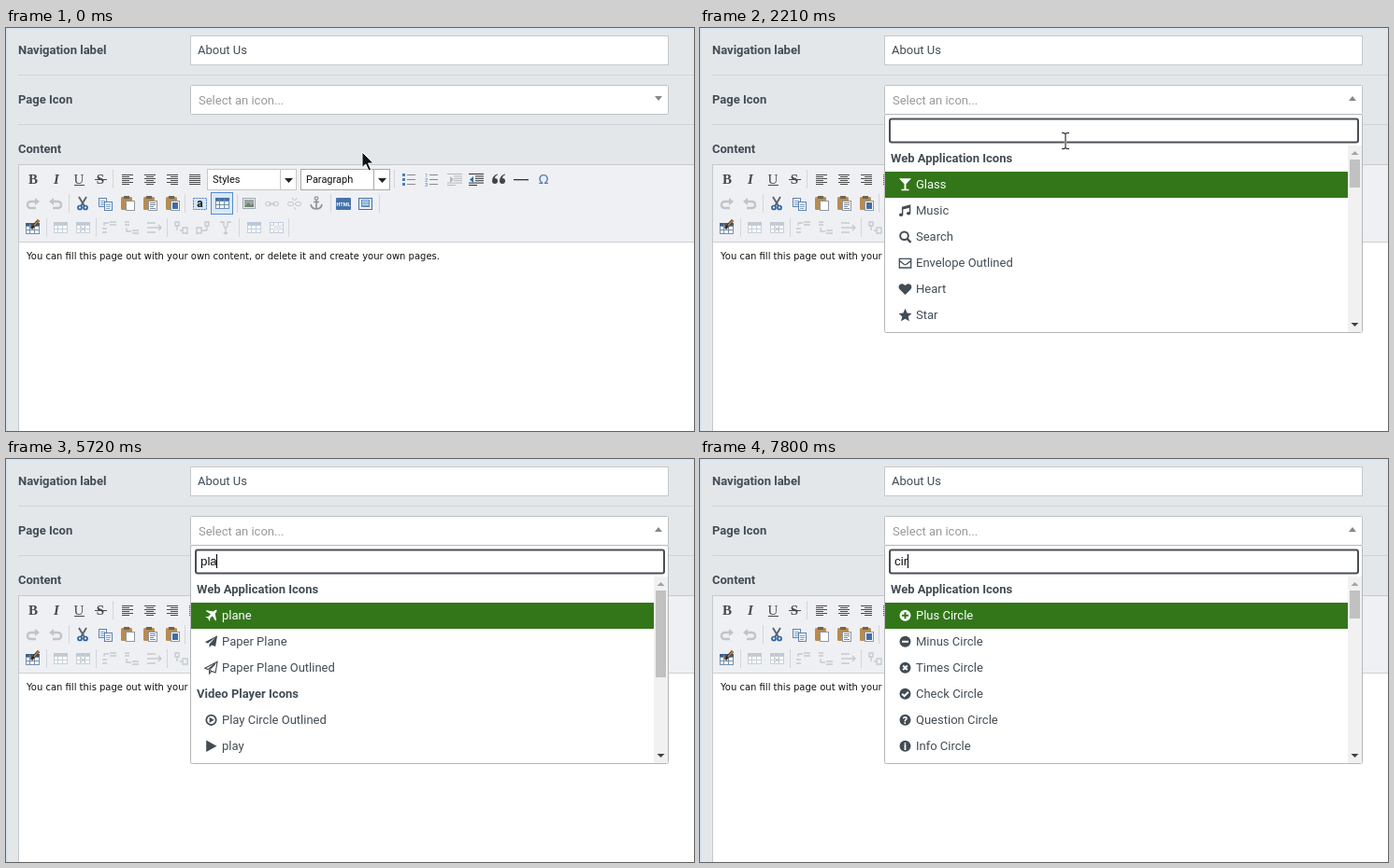
Recreate the animation shown at these times as an HTML page. Size 736x432 px, loop 8000 ms.

```html
<!DOCTYPE html>
<html lang="en">
<head>
<meta charset="utf-8">
<title>Icon picker</title>
<style>
html, body { margin: 0; width: 100%; height: 100%; overflow: hidden; background: #e4e7ea; }
svg { display: block; width: 736px; height: 432px; font: 13px Roboto, sans-serif; }
text { white-space: pre; }
.k { stroke: var(--bg); fill: none; stroke-width: 2; }
.l { stroke: currentColor; fill: none; }
</style>
</head>
<body>
<svg id="stage" viewBox="0 0 736 432" xmlns="http://www.w3.org/2000/svg"></svg>
<script>
const LOOP = 8000, STEP = 130, OPEN = 1300, BLINK = 530;
const INK = '#424c55', EDGE = '#c5c9cc', DIM = '#bfc4ca', BLUE = '#4b7fb8';

const rect = (x, y, w, h, fill, more = '') =>
  `<rect x="${x}" y="${y}" width="${w}" height="${h}" fill="${fill}" ${more}/>`;
const box = (x, y, w, h, fill, line, more = '') =>
  rect(x + .5, y + .5, w - 1, h - 1, fill, `stroke="${line}" ${more}`);
const shape = (d, fill) => `<path d="${d}" fill="${fill}"/>`;
const line = (d, color, w = 1) =>
  `<path d="${d}" fill="none" stroke="${color}" stroke-width="${w}"/>`;
const text = (x, y, s, fill = INK, more = '') =>
  `<text x="${x}" y="${y}" fill="${fill}" ${more}>${s}</text>`;
const at = (x, y, s) => `<g transform="translate(${x} ${y})">${s}</g>`;
const bold = 'font-weight="700"';

// ---- list icons, drawn around 0,0 in a 14px square ----
const solid = d => shape(d, 'currentColor');
const stroke = (d, w = 1.4) => `<path class="l" d="${d}" stroke-width="${w}"/>`;
const ring = (x, y, r, w) => `<circle class="l" cx="${x}" cy="${y}" r="${r}" stroke-width="${w}"/>`;
const cut = d => `<path class="k" d="${d}"/>`;
const disc = inner => '<circle r="6" fill="currentColor"/>' + inner;
const mark = s => text(0, 3.8, s, 'var(--bg)', 'text-anchor="middle" font-size="10.5" font-weight="900"');
const lens = ring(-1, -1, 4.3, 2) + stroke('M2.2 2.2L6 6', 2.4);
const dart = 'M6.6-6.6L4.6 5.2.5 3.6-2 6.3V2.6L4.5-4.5-3.5 1.8-6.7.4Z';
const icons = {
  glass: solid('M-6.5-6.5H6.5L1-.5V5H4V6.5H-4V5H-1V-.5Z'),
  music: solid('M-3.6 4.5V-4L5.8-6.5V3H4.4V-3L-2.2-1.2V4.5Z') +
    solid('M-6.6 4.5a2.2 1.8 0 1 0 4.4 0a2.2 1.8 0 1 0-4.4 0ZM1.4 3a2.2 1.8 0 1 0 4.4 0a2.2 1.8 0 1 0-4.4 0Z'),
  search: lens,
  zoomIn: lens + stroke('M-3.2-1H1.2M-1-3.2V1.2', 1.3),
  zoomOut: lens + stroke('M-3.2-1H1.2', 1.3),
  envelope: stroke('M-6.2-4.5H6.2V5.2H-6.2ZM-6-2.2L-1 1.7Q0 2.4 1 1.7L6-2.2', 1.3),
  heart: solid('M0 6.2L-5.8.4C-9-3-4.5-8.3 0-3.8C4.5-8.3 9-3 5.8.4Z'),
  star: solid('M0-7L2.1-2.4 7-1.9 3.3 1.5 4.4 6.5 0 4-4.4 6.5-3.3 1.5-7-1.9-2.1-2.4Z'),
  power: stroke('M-3-4.2A5.1 5.1 0 1 0 3-4.2M0-6.5V0', 1.9),
  phones: stroke('M-5.6 3V0A5.6 5.2 0 0 1 5.6 0V3', 1.7) + solid('M-4.5 1H-2V6H-4.5ZM2 1H4.5V6H2Z'),
  volume: solid('M-7-2H-4.5L-1-5V5L-4.5 2H-7Z') +
    stroke('M1-2A3 3 0 0 1 1 2M2.6-3.8A5 5 0 0 1 2.6 3.8M4.2-5.4A7.2 7.2 0 0 1 4.2 5.4', 1.3),
  print: stroke('M-4-1V-5.5H2L4-3.5V-1') + solid('M-6.5 0Q-6.5-1.2-5.3-1.2H5.3Q6.5-1.2 6.5 0V4.4H-6.5Z') +
    '<path d="M-4 2H4V5.5H-4Z" fill="var(--bg)" stroke="currentColor" stroke-width="1.3"/>',
  plane: solid('M6-6Q3.7-6.4 2.4-4.3L-4.9-5.6-5.8-4.7-.5-1.5-3.2 1.3-5.4 1.1-6 1.8-3.2 3.1-1.9 6-1.2 5.3-1.4 3.1 1.4.4 4.6 5.8 5.5 4.9 4.2-2.4Q6.4-3.7 6-6Z'),
  dart: solid(dart),
  dartLine: stroke(dart + 'M-2 2.6L.5 3.6', 1.1),
  playRing: ring(0, 0, 5.2, 1.8) + solid('M-1.9-3L3.2 0-1.9 3Z'),
  play: solid('M-5.3-6.2L6 0-5.3 6.2Z'),
  plusDisc: disc(cut('M-3.5 0H3.5M0-3.5V3.5')),
  minusDisc: disc(cut('M-3.5 0H3.5')),
  timesDisc: disc(cut('M-2.3-2.3L2.3 2.3M2.3-2.3L-2.3 2.3')),
  checkDisc: disc(cut('M-3.4 0L-.9 2.4 3.4-2')),
  askDisc: disc(mark('?')),
  infoDisc: disc(mark('i')),
  plus: stroke('M-5.5 0H5.5M0-5.5V5.5', 2.6),
  plusBox: solid('M-6-6H6V6H-6Z') + cut('M-4 0H4M0-4V4'),
  reply: solid('M-7-1L-2-6V-3Q6-3 6 5Q3 1-2 1V4Z'),
  cog: ring(0, 0, 3.6, 3) + `<circle class="l" r="5.8" stroke-width="2" stroke-dasharray="2.3 2.25"/>`,
  clock: ring(0, 0, 5.2, 1.8) + stroke('M0-3.2V.6H-2.5')
};

// A row without an icon is a group heading.
const web = ['Web Application Icons'];
const circles = [web, ['Plus Circle', 'plusDisc'], ['Minus Circle', 'minusDisc'], ['Times Circle', 'timesDisc'],
  ['Check Circle', 'checkDisc'], ['Question Circle', 'askDisc'], ['Info Circle', 'infoDisc']];
const results = {
  '': [web, ['Glass', 'glass'], ['Music', 'music'], ['Search', 'search'],
    ['Envelope Outlined', 'envelope'], ['Heart', 'heart'], ['Star', 'star']],
  p: [web, ['Envelope Outlined', 'envelope'], ['Search Plus', 'zoomIn'], ['Power Off', 'power'],
    ['headphones', 'phones'], ['volume-up', 'volume'], ['print', 'print']],
  pl: [web, ['Search Plus', 'zoomIn'], ['Plus Circle', 'plusDisc'], ['plane', 'plane'],
    ['plus', 'plus'], ['Reply All', 'reply'], ['Plus Square', 'plusBox']],
  pla: [web, ['plane', 'plane'], ['Paper Plane', 'dart'], ['Paper Plane Outlined', 'dartLine'],
    ['Video Player Icons'], ['Play Circle Outlined', 'playRing'], ['play', 'play']],
  c: [web, ['Music', 'music'], ['Search', 'search'], ['Search Plus', 'zoomIn'],
    ['Search Minus', 'zoomOut'], ['Cog', 'cog'], ['Clock Outlined', 'clock']],
  ci: circles,
  cir: circles
};
const typing = [[OPEN, ''], [4420, 'p'], [4940, 'pl'], [5330, 'pla'], [5850, 'pl'],
  [5980, 'p'], [6110, ''], [6370, 'c'], [6500, 'ci'], [6630, 'cir']];

const listRow = ([label, icon], i) => {
  const y = 139.5 + i * 28;
  if (!icon) return text(204, y + 4.5, label, INK, bold);
  const on = i === 1, ink = on ? '#fff' : INK;
  return (on ? rect(198, 154, 495, 28, '#33761a') : '') +
    `<g style="color:${ink};--bg:${on ? '#33761a' : '#fff'}">${at(219.5, y + 28 * 0 + .3, icons[icon])}</g>` +
    text(231, y + 4.5, label, ink);
};

// ---- toolbar ----
const rows = (x, y, widths, color, gap = 2) =>
  widths.map(([dx, w], i) => rect(x + dx, y + i * gap, w, 1, color)).join('');
const align = (x, kind) => rows(x - 6, 157, [0, 1, 2, 3, 4, 5].map(i => {
  const w = kind === 3 || i % 2 === 0 ? 12 : 8;
  return [kind === 1 ? (12 - w) / 2 : kind === 2 ? 12 - w : 0, w];
}), '#4a4a4a');
const letter = (x, s, more) =>
  text(x, 167, s, '#484848', `text-anchor="middle" font-family="'Liberation Serif', serif" font-size="15" ${more}`);
const pick = (x, s, edge) => box(x, 151, 96, 23, '#fff', edge) + line(`M${x + 78.5} 152V173`, edge) +
  text(x + 6, 165.5, s, '#111', 'font-size="11"') + shape(`M${x + 83} 161H${x + 92}L${x + 87.5} 166Z`, '#222');
const grid = (x, y, color, head) => box(x - 7, y - 6, 15, 12, '#f8fafc', color) +
  (head ? rect(x - 7, y - 6, 15, 3, head) : '') +
  line(`M${x - 6} ${y - 2.5}H${x + 7}M${x - 6} ${y + 1.5}H${x + 7}M${x - 2.5} ${y - 5}V${y + 5}M${x + 2.5} ${y - 5}V${y + 5}`, color);
const bullets = (x, color, numbers) => [157, 162, 167].map((y, i) =>
  (numbers ? text(x - 7, y + 2.5, i + 1, BLUE, 'font-size="6"') : rect(x - 7, y - 1, 3, 3, BLUE)) +
  rect(x - 2, y, 9, 1, color)).join('');
const indent = (x, color, dir, tip) => rows(x - 8, 156, [[0, 16], [7, 9], [7, 9], [7, 9], [0, 16], [0, 9]], color, 2.4) +
  shape(`M${x + 3 * dir - 4} 162.5l${-4 * dir}-3.5v7Z`, tip);
const board = (x, page) => rect(x - 7, 181, 12, 14, '#b98b50', 'rx="1.5"') + rect(x - 4, 180, 6, 3, '#6e6552') +
  box(x - 2, 185, 10, 11, '#fff', '#8c97a5') + page;
const bend = (x, flip) => at(x, 188, `<g transform="scale(${flip} 1)">` +
  line('M-4-2H2Q6-2 6 1.5T2 5H-3', DIM, 2.4) + shape('M-7-2L-2-6V2Z', DIM) + '</g>');
const chain = (x, broken) => box(x - 7, 186, 7, 5, 'none', DIM, 'rx="2"') + box(x + 1, 186, 7, 5, 'none', DIM, 'rx="2"') +
  (broken ? line(`M${x - 2} 182l2 3M${x + 2} 195l-2-3M${x + 3} 182l-2 3`, DIM) : rect(x - 3, 188, 7, 1, DIM));
const faint = (x, d) => at(x, 214, line(d, '#c3c9d0', 1.3));
const seps = (y, xs) => xs.map(x => rect(x, y - 10, 1, 20, '#d3d6da')).join('');

const toolbar = () => [
  letter(29, 'B', bold), letter(54, 'I', bold + ' font-style="italic"'), letter(78, 'U', ''), rect(73, 168, 11, 1, '#484848'),
  letter(101, 'S', bold), rect(95, 162, 13, 1, '#484848'),
  seps(162, [114, 415]), [130, 154, 178, 202].map(align).join(''),
  pick(215, 'Styles', '#c8c8c8'), pick(315, 'Paragraph', '#a9a9a9'),
  bullets(431, '#888'), bullets(455, '#888', true),
  indent(480, '#b4b8bd', 1, '#b4b8bd'), indent(503, '#333', -1, '#2f6fb5'),
  at(527, 162, [-7, 1].map(x => shape(`M${x + 6}-5.5Q${x}-4 ${x} 2A3 3 0 1 0 ${x + 3}-1Q${x + 3}-3.5 ${x + 6}-4.5Z`, '#444')).join('')),
  rect(543, 162, 16, 1.3, '#333'),
  text(575, 167, 'Ω', BLUE, 'text-anchor="middle" font-family="\'DejaVu Sans\', sans-serif" font-size="14"'),

  bend(29, -1), bend(53, 1), seps(188, [67, 191, 247, 347, 399]),
  at(82, 188, line('M-4-7L2 3M4-7L-2 3', '#56606c', 1.8) +
    '<g fill="none" stroke="#2d62a3" stroke-width="1.7"><circle cx="-3" cy="4.5" r="2"/><circle cx="3" cy="4.5" r="2"/></g>'),
  [[-7, -6], [-1, -2]].map(([x, y]) => box(106 + x, 188 + y, 9, 10, '#f4f8fd', '#5d82b0') +
    rows(108 + x, 191 + y, [[0, 5], [0, 5], [0, 4]], '#7fa0c8')).join(''),
  board(130, ''), board(154, rows(154, 187, [[0, 6], [0, 6], [0, 4], [0, 6]], '#7b8592')), board(178, rect(178, 187, 6, 7, '#3f6cad')),
  box(200, 182, 15, 13, '#d7e7f7', BLUE, 'stroke-dasharray="2 1"'),
  text(207.5, 192, 'a', '#1d2733', 'text-anchor="middle" font-weight="900" font-size="12"'),
  box(219, 176, 24, 24, '#d9e8f8', '#4f8fcd'), grid(231, 188, '#6d8eb4', '#466d9c'),
  box(253, 182, 14, 12, '#eceeef', '#a3a8ad'), rect(255, 184, 10, 8, '#9ba6a4'), shape('M255 192L259 187 262 190 265 188V192Z', '#71806f'),
  chain(284), chain(308, true),
  at(332, 188, line('M0-4V6M-3-1.5H3M-6 1Q-5 6 0 6T6 1', '#8d949d', 1.7) + '<circle cy="-5.5" r="1.7" fill="none" stroke="#8d949d" stroke-width="1.3"/>'),
  rect(353, 182, 16, 13, '#4573ac', 'rx="1"'), text(361, 190.5, 'HTML', '#fff', 'text-anchor="middle" font-size="5.5" font-weight="700"'),
  box(377, 182, 15, 13, '#eaf2fb', '#3f6fa8'), rect(380, 184, 9, 8, '#5f8fc6'), rows(381, 185, [[0, 7], [0, 7], [0, 7]], '#dfecf9'),

  grid(28, 215, '#7590ad', '#3f5f85'), line('M27 215L35 206', '#3b2c1c', 3), line('M30 212L35 206', '#c08b45', 1.6),
  seps(214, [43, 96, 172, 249, 302]),
  grid(58, 214, '#c9d0d7', '#bfc9d4'), grid(82, 214, '#c9d0d7', '#bfc9d4'), line('M80 213l5 5M85 213l-5 5', '#b9bfc7'),
  faint(110, 'M-7 5H-2M-7 1H-2M1-6H8M1-3H8M-5-2V-5H0'),
  faint(134, 'M-7-6H-2M-7-3H-2M1 3H8M1 6H8M-5 0V4H0'),
  faint(158, 'M-7-5H2M-7 5H2M-7 0H8M5-3L8 0 5 3'),
  faint(187, 'M-6-6H-2V-2H-6ZM-4-2V3M2 0H7V6H2ZM-1 3H2'),
  faint(211, 'M2-6H6V-2H2ZM4-2V3M-7 0H-2V6H-7ZM-2 3H4'),
  faint(235, 'M-6-6H-2V-2L0 1V7M6-6H2V-2L0 1M-2 5L0 7 2 5'),
  grid(265, 214, '#c3cedb', '#b9c7d8'), grid(289, 214, '#c3cedb'), rect(286, 211, 9, 6, '#e3e9ef')
].join('');

const page = rect(0, 0, 736, 432, '#e4e7ea') + rect(0, 0, 736, 2, '#d7e7f5') + rect(0, 0, 2, 432, '#d2e5f7') +
  rect(13, 50, 723, 1, '#d0d3d7') + rect(13, 103, 723, 1, '#d0d3d7') +
  text(13, 28, 'Navigation label', INK, bold) + text(13, 81, 'Page Icon', INK, bold) + text(13, 134, 'Content', INK, bold) +
  box(197, 8, 512, 32, '#fff', EDGE) + text(205, 28, 'About Us') +
  box(13, 146, 740, 300, '#fff', EDGE) + rect(14, 147, 722, 82, '#eff0f3') + rect(14, 229, 722, 1, '#cdd0d3') +
  toolbar() +
  text(22, 248, 'You can fill this page out with your own content, or delete it and create your own pages.', '#0d120d',
    'font-family="\'DejaVu Sans\', sans-serif" font-size="10"') +
  box(197, 61, 512, 32, '#fff', '#bfc2c4', 'rx="1"') + text(206, 82, 'Select an icon...', '#999');

const panel = box(197, 92, 512, 235, '#fff', '#b4b7b9', 'rx="2"') +
  rect(203, 97.5, 501, 25, '#fff', 'stroke="#4b4f54" stroke-width="2" rx="2"') +
  rect(693, 126, 15, 200, '#f1f1f1') + shape('M696.5 136H704.5L700.5 132Z', '#a3a3a3') +
  shape('M696.5 316H704.5L700.5 320Z', '#404040');

const cursors = {
  arrow: `<path d="M0 0V16.5L3.8 13 7 20 9.6 18.9 6.6 12H12Z" fill="#111" stroke="#fff"/>`,
  hand: `<path d="M-1.5 1Q0-.8 1.5 1V7Q3 5.8 4.4 7.2 6 6.3 7 7.8 9-.4 9.6 9.5V13Q9 15.5 8 18H-.5Q-2 15-5.5 10.8-5.8 8.6-3.6 9L-1.5 11Z" fill="#fff" stroke="#111" stroke-width="1.2" stroke-linejoin="round"/>`
    .replace('9-.4 9.6 9.5', '9.4 7.4 9.6 9.5') + line('M1.5 7V10M4.4 7.5V10M7 8V10.5', '#111'),
  beam: line('M-4-8.5H-1.5L0-7.5 1.5-8.5H4M0-8V8M-4 8.5H-1.5L0 7.5 1.5 8.5H4', '#fff', 2.4) +
    line('M-4-8.5H-1.5L0-7.5 1.5-8.5H4M0-8V8M-4 8.5H-1.5L0 7.5 1.5 8.5H4', '#222', 1.1)
};

const $ = id => document.getElementById(id);
$('stage').innerHTML = page + '<path id="tip" fill="#888"/>' +
  `<g id="drop">${panel}<g id="list"></g><rect id="thumb" x="695" y="141" width="11" fill="#c1c1c1"/>` +
  text(208, 114, '', '#111', 'id="query" font-family="\'Liberation Sans\', Arial, sans-serif" font-size="13.33"') +
  rect(208, 102, 1, 15, '#000', 'id="caret"') + '</g><g id="cursor"></g>';

const show = (el, on) => el.setAttribute('visibility', on ? 'visible' : 'hidden');
const progress = (t, a, b) => {
  const u = Math.min(1, Math.max(0, (t - a) / (b - a)));
  return u * u * (3 - 2 * u);
};
let lastQuery = null, lastKind = null;

function pointer(t) {
  const now = Math.floor(t / STEP) * STEP;
  const rise = progress(now, 0, 390), fall = progress(now, OPEN, 1820);
  const x = 381 + 12 * rise - 2 * fall, y = 133 - 56 * rise + 44 * fall;
  const kind = fall && y > 93 ? 'beam' : y < 93 ? 'hand' : 'arrow';
  if (kind !== lastKind) $('cursor').innerHTML = cursors[lastKind = kind];
  $('cursor').setAttribute('transform', `translate(${x.toFixed(1)} ${y.toFixed(1)})`);
  show($('cursor'), t < 4940);
}

function draw(t) {
  const open = t >= OPEN;
  $('drop').style.display = open ? '' : 'none';
  $('tip').setAttribute('d', open ? 'M694 78H702L698 73Z' : 'M694 73H702L698 78Z');
  pointer(t);
  if (!open) return;
  const [since, query] = typing.filter(k => k[0] <= t).pop();
  if (query !== lastQuery) {
    lastQuery = query;
    $('list').innerHTML = results[query].map(listRow).join('');
    $('query').textContent = query;
    $('thumb').setAttribute('height', query === 'pla' ? 93 : 30);
    $('caret').setAttribute('x', 208 + Math.floor(query ? $('query').getComputedTextLength() : 0));
  }
  $('caret').style.display = Math.floor((t - since) / BLINK) % 2 ? 'none' : '';
}

const start = performance.now();
(function tick() {
  draw((performance.now() - start) % LOOP);
  requestAnimationFrame(tick);
})();
</script>
</body>
</html>
```
